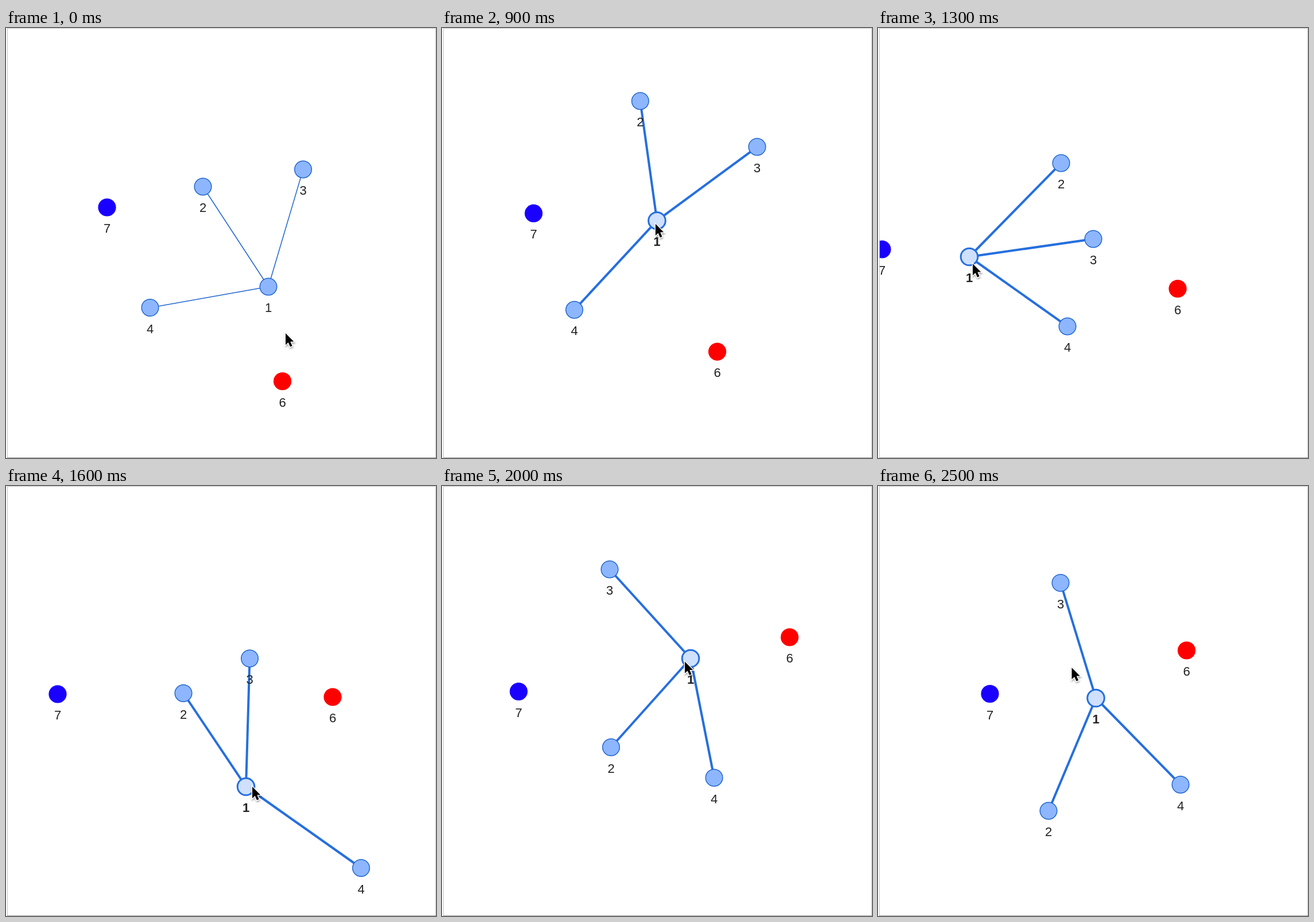
Recreate the animation shown at these times as an HTML page. Size 749 by 748 pixels, loop 2600 ms.

```html
<!DOCTYPE html>
<html lang="en">
<head>
<meta charset="utf-8">
<title>Dragged graph</title>
<style>
  html, body { margin: 0; width: 100%; height: 100%; overflow: hidden; background: #fff; }
  svg { display: block; width: 100%; height: 100%; }
  text { font: 22px "Liberation Sans", Arial, sans-serif; fill: #222; text-anchor: middle; }
  .node { fill: #8db6ff; stroke: #2166cf; stroke-width: 1.5; }
  .edge { stroke: #2166cf; stroke-width: 1.5; }
  .held .edge { stroke: #266fde; stroke-width: 4; }
  .held .hub { fill: #cfe0fd; stroke: #266fde; stroke-width: 3; }
  .held .hubLabel { font-weight: bold; }
</style>
</head>
<body>
<svg viewBox="0 0 749 748">
  <defs>
    <clipPath id="inner"><rect x="3" y="1" width="745" height="746"/></clipPath>
    <filter id="shadow" x="-50%" y="-30%" width="220%" height="180%">
      <feDropShadow dx="0.5" dy="2" stdDeviation="1.6" flood-color="#000" flood-opacity="0.4"/>
    </filter>
  </defs>
  <rect width="749" height="748" fill="#fff"/>
  <path d="M2.5 748V.5H748.5V748" fill="none" stroke="#c4c4c4"/>
  <path d="M2 747.5H749" stroke="#999"/>
  <g id="graph" clip-path="url(#inner)"></g>
  <g id="cursor" filter="url(#shadow)">
    <path d="M0 0V20.2L4.7 15.9L8 23.6L11.6 22.1L8.3 14.5H14.3Z" fill="#000"
          stroke="#fff" stroke-width="2.6" paint-order="stroke"/>
  </g>
</svg>
<script>
const LOOP = 2600, STEP = 100, GRAB = 7;
const graph = document.getElementById('graph');
const cursor = document.getElementById('cursor');

// Poses are shared by all nodes: the grab, the turns of the drag, the end.
const poses = [GRAB, 11, 13, 16, 20, 25];
const track = (...points) => points.map((p, i) => [poses[i], ...p]);

const hub = [[GRAB, 457, 450], [10, 310, 295], [11, 235, 316], [13, 159, 398],
  [16, 418, 523], [20, 433, 300], [22, 375, 290], [25, 379.5, 369]];

const linked = {
  2: track([343, 276], [336, 126], [319, 235], [309, 360.5], [294.5, 454.5], [297, 565]),
  3: track([517.5, 246], [455.5, 319], [375, 367], [424.5, 300], [292, 145], [318, 168.5]),
  4: track([251, 486.5], [293, 522], [330, 519], [618.5, 664.5], [474, 507.5], [527, 519.5])
};

const free = {
  6: track([481.5, 614.5], [477.5, 489], [522, 453.5], [569, 367], [605.5, 263], [537.5, 286]),
  7: track([176, 312], [121, 344.5], [7, 385], [90, 362], [133.5, 357.5], [195, 361.5])
};

// Pointer tip relative to the hub: a sweep before the grab, a release at the end.
const grip = [[0, 30, 81], [3, -100, -137], [6, 0, 4.5], [11, -4, 6.5],
  [13, 6, 12], [16, 11, 0], [20, -10, 5.5], [25, -42, -53]];

function slope(keys, i, axis) {
  if (i === 0 || i === keys.length - 1) return 0;
  const rate = j => (keys[j + 1][axis] - keys[j][axis]) / (keys[j + 1][0] - keys[j][0]);
  const a = rate(i - 1), b = rate(i);
  return a * b <= 0 ? 0 : 2 * a * b / (a + b);
}

// Monotone cubic: smooth between keys, never past them.
function at(keys, s) {
  const last = keys.length - 1;
  if (s <= keys[0][0]) return keys[0].slice(1);
  if (s >= keys[last][0]) return keys[last].slice(1);
  const i = keys.findIndex(k => k[0] > s) - 1;
  const p = keys[i], q = keys[i + 1], span = q[0] - p[0], u = (s - p[0]) / span;
  return [1, 2].map(axis => {
    const ease = u * u * (3 - 2 * u);
    const bend = u * (1 - u) * ((1 - u) * slope(keys, i, axis) - u * slope(keys, i + 1, axis));
    return p[axis] + (q[axis] - p[axis]) * ease + bend * span;
  });
}

// Linked nodes swing around the hub, taking the shorter way between poses.
function toPolar(keys) {
  let prev = 0;
  return keys.map(([s, x, y]) => {
    const [hx, hy] = at(hub, s), turn = 2 * Math.PI;
    let angle = Math.atan2(y - hy, x - hx);
    angle += turn * Math.round((prev - angle) / turn);
    prev = angle;
    return [s, angle, Math.hypot(x - hx, y - hy)];
  });
}

function swing(keys) {
  const polar = toPolar(keys);
  return s => {
    const [hx, hy] = at(hub, s), [angle, length] = at(polar, s);
    return [hx + length * Math.cos(angle), hy + length * Math.sin(angle)];
  };
}

function set(el, attrs) {
  for (const name in attrs) el.setAttribute(name, attrs[name]);
}

function add(tag, attrs) {
  const el = document.createElementNS('http://www.w3.org/2000/svg', tag);
  set(el, attrs);
  return graph.appendChild(el);
}

const edges = Object.keys(linked).map(id => ({ id, line: add('line', { class: 'edge' }) }));

function addNode(id, place, look) {
  return { id, place, dot: add('circle', look) };
}

const solid = fill => ({ r: 15.6, fill });
const nodes = [
  addNode(1, s => at(hub, s), { r: 14.8, class: 'node hub' }),
  ...Object.keys(linked).map(id => addNode(id, swing(linked[id]), { r: 14.8, class: 'node' })),
  addNode(6, s => at(free[6], s), solid('#f00')),
  addNode(7, s => at(free[7], s), solid('#1a00ff'))
];
for (const node of nodes) {
  node.label = add('text', node.id === 1 ? { class: 'hubLabel' } : {});
  node.label.textContent = node.id;
}

function draw(time) {
  const s = Math.floor(time % LOOP / STEP);
  const pos = {};
  graph.classList.toggle('held', s >= GRAB);
  for (const { id, place, dot, label } of nodes) {
    const [x, y] = pos[id] = place(s);
    set(dot, { cx: x, cy: y });
    set(label, { x, y: y + 44 });
  }
  const [hx, hy] = pos[1], [dx, dy] = at(grip, s);
  for (const { id, line } of edges) {
    set(line, { x1: hx, y1: hy, x2: pos[id][0], y2: pos[id][1] });
  }
  set(cursor, { transform: `translate(${hx + dx} ${hy + dy})` });
}

const start = performance.now();
function tick() {
  draw(performance.now() - start);
  requestAnimationFrame(tick);
}
tick();
</script>
</body>
</html>
```
